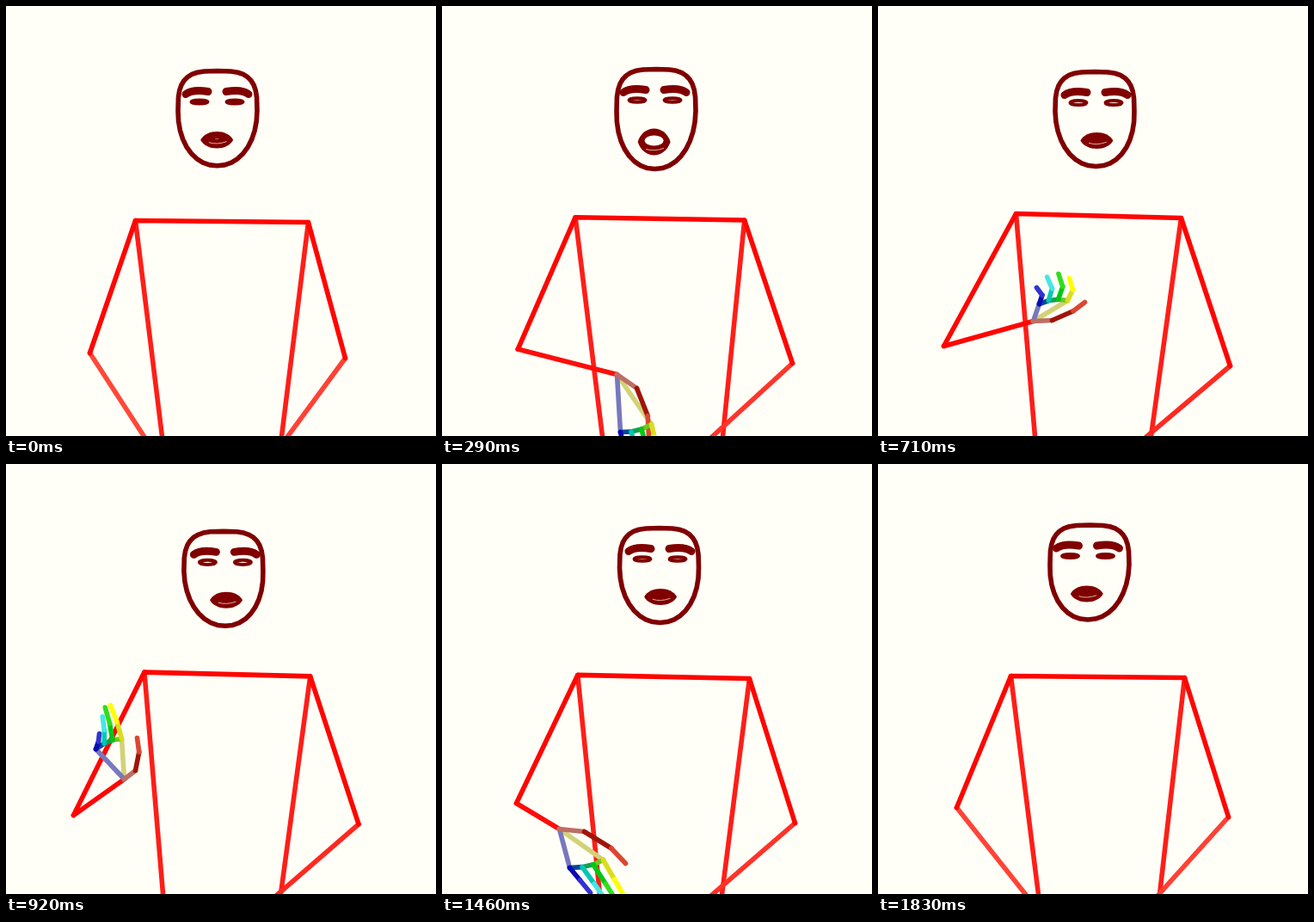
Animation of 500 by 500 pixels, one loop 1.87 s. Source, as an HTML page with a canvas:

```html
<!DOCTYPE html>
<html>
<head>
<meta charset="utf-8">
<style>
html, body { margin: 0; width: 100%; height: 100%; overflow: hidden; background: #fffff8; }
canvas { display: block; width: 100vw; height: 100vh; }
</style>
</head>
<body>
<canvas id="stage" width="500" height="500"></canvas>
<script>
const LOOP = 1870, STEP = 125 / 3, LAST = 44;
const PAPER = '#fffff8', SKIN = '#800000', WIDTH = 5.6;
const c = document.getElementById('stage').getContext('2d');

const lerp = (a, b, u) => a + (b - a) * u;
const mix = (p, q, u) => [lerp(p[0], q[0], u), lerp(p[1], q[1], u)];
const shift = (p, d, k) => [p[0] + d[0] * k, p[1] + d[1] * k];
const turned = ([x, y], a) => [x * Math.cos(a) - y * Math.sin(a), x * Math.sin(a) + y * Math.cos(a)];
const bump = (f, at, width) => Math.exp(-(((f - at) / width) ** 2));

// smooth curve through a few keys of the form [step, ...values]
function track(...keys) {
  const end = keys.length - 1;
  const slope = (n, i) => {
    const a = keys[Math.max(n - 1, 0)], b = keys[Math.min(n + 1, end)];
    return (b[i] - a[i]) / (b[0] - a[0]);
  };
  return f => {
    let k = 0;
    while (k < end - 1 && f >= keys[k + 1][0]) k++;
    const from = keys[k], to = keys[k + 1], d = to[0] - from[0];
    const u = Math.min(Math.max((f - from[0]) / d, 0), 1);
    return from.map((v, i) => lerp(v, to[i], u * u * (3 - 2 * u)) +
      d * u * (1 - u) * (slope(k, i) * (1 - u) - slope(k + 1, i) * u)).slice(1);
  };
}

const shoulderL = track([0, 150, 249], [17, 160, 241], [29, 159, 244], [LAST, 154, 246]);
const shoulderR = track([0, 351, 251], [17, 352, 246], [35, 357, 249], [LAST, 356, 248]);
const elbowL = track([0, 97, 403], [17, 76, 395], [22, 78, 408], [29, 101, 402], [35, 86, 394], [LAST, 91, 399]);
const elbowR = track([0, 394, 409], [7, 407, 415], [17, 409, 418], [35, 410, 417], [LAST, 407, 410]);
const wristL = track([0, 188, 543], [7, 203, 428], [17, 180, 366], [22, 137, 366], [29, 121, 399], [35, 136, 424], [LAST, 199, 535]);
// where the sides and the right forearm leave the stage
const exits = track([0, 181, 320, 327], [7, 186, 326, 314], [17, 182, 317, 312], [29, 183, 324, 320], [35, 183, 325, 314], [LAST, 186, 327, 326]);
// centre, top and sideways look
const head = track([0, 245.5, 75, -.5], [7, 248.5, 73, -1.5], [17, 251.5, 76, 1.5], [24, 252.5, 78, 2], [35, 252, 74, 1], [LAST, 245.5, 70.5, -2]);

// thumb joint and tip, index knuckle and tip, little knuckle and tip, seen from the wrist;
// stored without the turn, so that the hand swings round between keys
const grip = (step, turn, ...joints) => [step, turn, ...joints.flatMap(p => turned(p, -turn))];
const hand = track(
  grip(7, 1.3, [23, 16], [37, 72], [40, 58], [47, 87], [4, 67], [10, 92]),
  grip(17, -.8, [22, -1], [60, -22], [40, -24], [42, -50], [7, -20], [4, -39]),
  grip(22, -1.9, [13, -10], [15, -48], [-3, -47], [-16, -86], [-33, -35], [-29, -53]),
  grip(29, -2.1, [12, -3], [12, -13], [0, -18], [-23, -24], [-22, -6], [-46, -17]),
  grip(35, -2.1, [29, 3], [77, 40], [51, 36], [77, 81], [12, 45], [36, 74]));

function line(color, ...points) {
  c.beginPath();
  points.forEach(p => c.lineTo(...p));
  c.strokeStyle = color;
  c.stroke();
}

function ellipse(x, y, rx, ry) {
  c.beginPath();
  c.ellipse(x, y, rx, ry, 0, 0, 7);
}

function drawBody(f) {
  const red = pale => `rgb(255,${pale},${pale * .8})`;
  const leave = (p, x) => mix(p, [x, 500], 1.1);
  const sl = shoulderL(f), sr = shoulderR(f), el = elbowL(f), er = elbowR(f), wrist = wristL(f);
  const [sideL, sideR, arm] = exits(f);
  line(red(30), sl, leave(sl, sideL));
  line(red(30), sr, leave(sr, sideR));
  // forearms fade as they drop out of view
  line(red(Math.max(5, (wrist[1] - 400) / 2)), el, wrist);
  line(red(65 - 25 * Math.sin(Math.PI * f / LAST)), er, leave(er, arm));
  line('#ff0500', el, sl, sr, er);
}

function drawOutline(cx, top, height, look) {
  const crown = height * .42;
  c.beginPath();
  for (let a = 0; a < 2 * Math.PI; a += Math.PI / 18) {
    const lower = Math.sin(a) > 0, n = lower ? 2.1 : 3.2;
    const curve = v => Math.sign(v) * Math.abs(v) ** (2 / n);
    const y = curve(Math.sin(a));
    c.lineTo(cx + 46 * curve(Math.cos(a)) + (lower ? look * y : 0), top + crown + y * (lower ? height - crown : crown));
  }
  c.closePath();
  c.stroke();
}

function drawMouth(x, y, gape) {
  const w = 19, h = 9.5 + 6 * gape;
  c.beginPath();
  c.moveTo(x - w, y);
  for (const side of [1, -1]) {
    c.bezierCurveTo(x - side * w * .65, y - side * h * 1.33, x + side * w * .65, y - side * h * 1.33, x + side * w, y);
  }
  c.fill();
  c.fillStyle = PAPER;
  ellipse(x, y - 1.5, 11 * Math.sqrt(gape), 6 * gape);
  c.fill();
  const fold = y + h * (.3 + .25 * gape);
  c.beginPath();
  c.moveTo(x - 9, fold);
  c.quadraticCurveTo(x, fold + 3, x + 11, fold - 1);
  c.lineWidth = 1;
  c.strokeStyle = '#d8b0a0';
  c.stroke();
}

function drawFace(f) {
  const [cx, top, look] = head(f), gape = bump(f, 7, 4);
  c.strokeStyle = c.fillStyle = SKIN;
  drawOutline(cx, top, 110 + 6 * gape, look);
  for (const side of [-1, 1]) {
    const x = cx + look + side * 20.5, y = top + 36;
    c.lineWidth = 4;
    ellipse(x, y, 9.5, 2 + .6 * Math.sin(Math.PI * f / LAST));
    c.stroke();
    c.lineWidth = 9;
    c.beginPath();
    c.moveTo(x + side * 16, y - 9);
    c.quadraticCurveTo(x + side * 8, y - 15, x - side * 10, y - 12);
    c.stroke();
  }
  drawMouth(cx + look * 1.6, top + 80 + 4.5 * gape, gape);
  c.lineWidth = WIDTH;
}

const fingers = [['#dcdc1e', '#ffff00'], ['#00c814', '#32dc1e'], ['#00c8b4', '#46e6e6'], ['#0a0ab4', '#3232d2']];
const palm = ['#6ec81e', '#14a050', '#0a4696'];

function drawHand(f) {
  const wrist = wristL(f), [turn, ...flat] = hand(f), curl = 5 * bump(f, 17, 4);
  const joint = i => shift(wrist, turned(flat.slice(2 * i, 2 * i + 2), turn), 1);
  const [thumb, thumbTip, index, indexTip, little, littleTip] = [0, 1, 2, 3, 4, 5].map(joint);
  const knuckle = mix(thumb, thumbTip, .5).map((v, i) => v + .25 * (thumb[i] - wrist[i]));

  line('#d2d278', wrist, index);
  line('#7878be', wrist, little);
  line('#be6e64', wrist, thumb);
  line('#a01408', thumb, knuckle);
  line('#dc4632', knuckle, thumbTip);

  // inner fingers lie evenly between the outer two and reach further
  const bones = fingers.map((_, i) => {
    const a = mix(index, little, i / 3), b = mix(indexTip, littleTip, i / 3);
    const length = Math.hypot(b[0] - a[0], b[1] - a[1]) || 1;
    const dir = [(b[0] - a[0]) / length, (b[1] - a[1]) / length], far = Math.sin(Math.PI * i / 3);
    const base = shift(a, dir, 3 * far), tip = shift(b, dir, 10 * far);
    return [base, shift(mix(base, tip, .5), [-dir[1], dir[0]], curl), tip];
  });
  palm.forEach((color, i) => line(color, bones[i][0], bones[i + 1][0]));
  bones.forEach(([base, mid, tip], i) => {
    line(fingers[i][0], base, mid);
    line(fingers[i][1], mid, tip);
  });
}

function draw(now) {
  const f = Math.floor((now % LOOP + 4) / STEP);
  c.setTransform(1, 0, 0, 1, 0, 0);
  c.fillStyle = PAPER;
  c.fillRect(0, 0, 500, 500);
  c.translate(.5, .5);
  c.lineWidth = WIDTH;
  c.lineCap = c.lineJoin = 'round';
  drawBody(f);
  drawFace(f);
  drawHand(f);
}

const start = performance.now();
function tick() {
  draw(performance.now() - start);
  requestAnimationFrame(tick);
}
tick();
</script>
</body>
</html>
```
